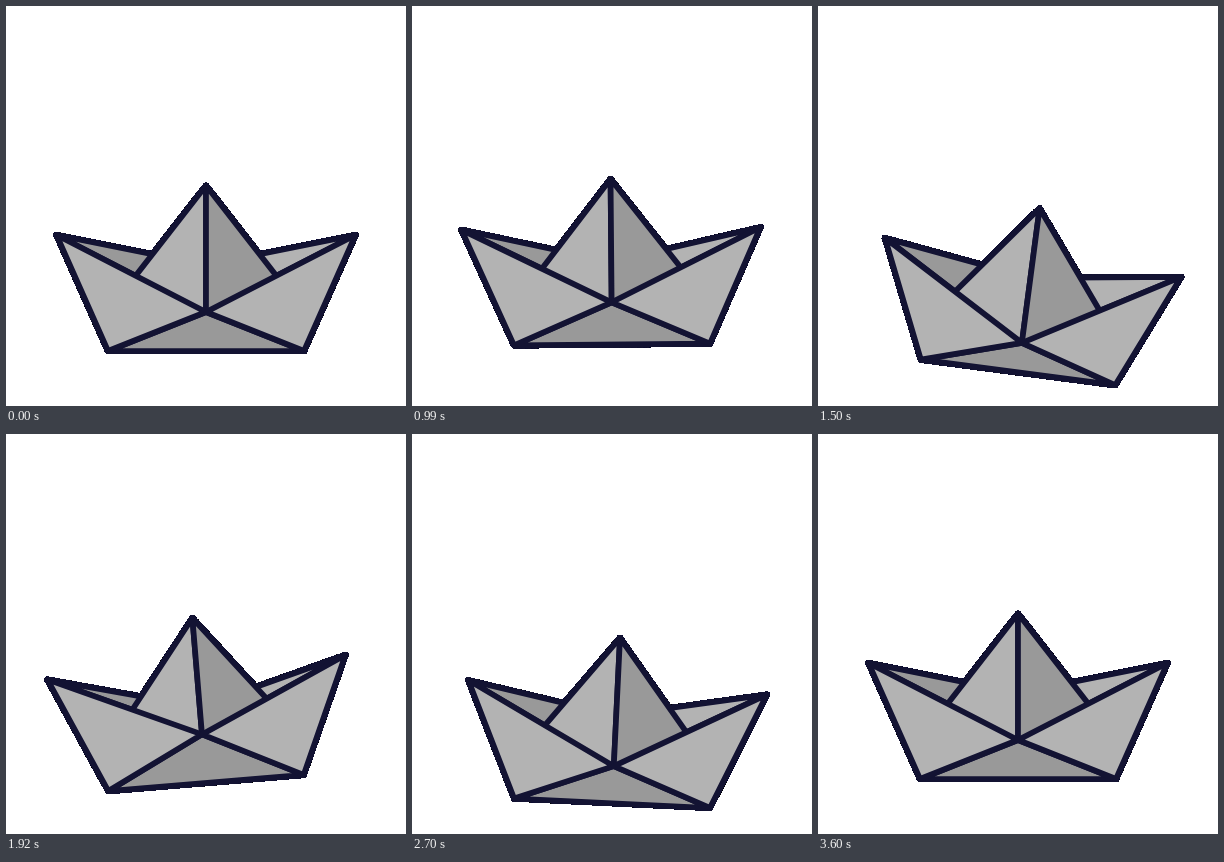
An HTML page with a canvas for the animation above (3930 ms loop, 400x400 px).

```html
<!DOCTYPE html>
<html lang="en">
<head>
<meta charset="utf-8">
<title>Paper boat</title>
<style>
  html, body { margin: 0; width: 100%; height: 100%; overflow: hidden; background: #fff; }
  canvas { display: block; width: 400px; height: 400px; }
</style>
</head>
<body>
<canvas id="stage" width="400" height="400"></canvas>
<script>
const ctx = document.getElementById('stage').getContext('2d', { willReadFrequently: true });
const LIGHT = '#b3b3b3', DARK = '#999999', INK = '#131333';
const STEP = 30, LOOP = 3930, LAST = 120, SWINGS = 5;

// Starts at rest, swings between high and low from step first to lastLow, then settles back.
function swing(n, rest, high, low, first, lastLow, end) {
  const mix = (a, b, from, to) =>
    a + (b - a) * (1 - Math.cos(Math.PI * Math.min(1, (n - from) / (to - from)))) / 2;
  if (n < first) return mix(rest, high, 0, first);
  if (n > lastLow) return mix(low, rest, lastLow, end);
  const phase = Math.PI * SWINGS * (n - first) / (lastLow - first);
  return (high + low) / 2 + (high - low) / 2 * Math.cos(phase);
}

function face(fill, ...points) {
  ctx.beginPath();
  points.forEach(p => ctx.lineTo(...p));
  ctx.closePath();
  ctx.fillStyle = fill;
  ctx.fill();
  ctx.stroke();
}

// Makes every touched pixel opaque, which gives the outline its crisp stepped edge.
function hardenEdge() {
  const image = ctx.getImageData(0, 0, 400, 400);
  for (let i = 3; i < image.data.length; i += 4) {
    if (image.data[i]) image.data[i] = 255;
  }
  ctx.putImageData(image, 0, 0);
}

function drawBoat(n) {
  const y = swing(n, 345, 369.3, 337, 17.5, 107.5, 120);
  const angle = swing(n, 0, 10.6, -4.9, 8.4, 99, 118);
  const tilt = swing(n, 0, 14, -10, 8.4, 99, 118);

  // The front fold drops and the back fold rises as the hull tilts.
  const front = [0, -39 + tilt], back = [0, -86 - tilt], apex = [0, -165.5];
  const left = [-149.5, -116], right = [149.5, -116];
  const baseLeft = [-98, 0], baseRight = [98, 0];

  ctx.setTransform(1, 0, 0, 1, 0, 0);
  ctx.clearRect(0, 0, 400, 400);
  ctx.translate(200, y);
  ctx.rotate(angle * Math.PI / 180);
  ctx.strokeStyle = INK;
  ctx.lineWidth = 5.7;
  ctx.lineJoin = 'round';

  face(DARK, left, back, front);
  face(LIGHT, right, back, front);
  face(LIGHT, apex, [-83, -59], front);
  face(DARK, apex, [83, -59], front);
  face(DARK, baseLeft, baseRight, front);
  face(LIGHT, left, front, baseLeft);
  face(LIGHT, right, front, baseRight);
  hardenEdge();
}

const start = performance.now();
function tick() {
  const time = (performance.now() - start) % LOOP;
  drawBoat(Math.min(LAST, Math.floor(time / STEP)));
  requestAnimationFrame(tick);
}
tick();
</script>
</body>
</html>
```
